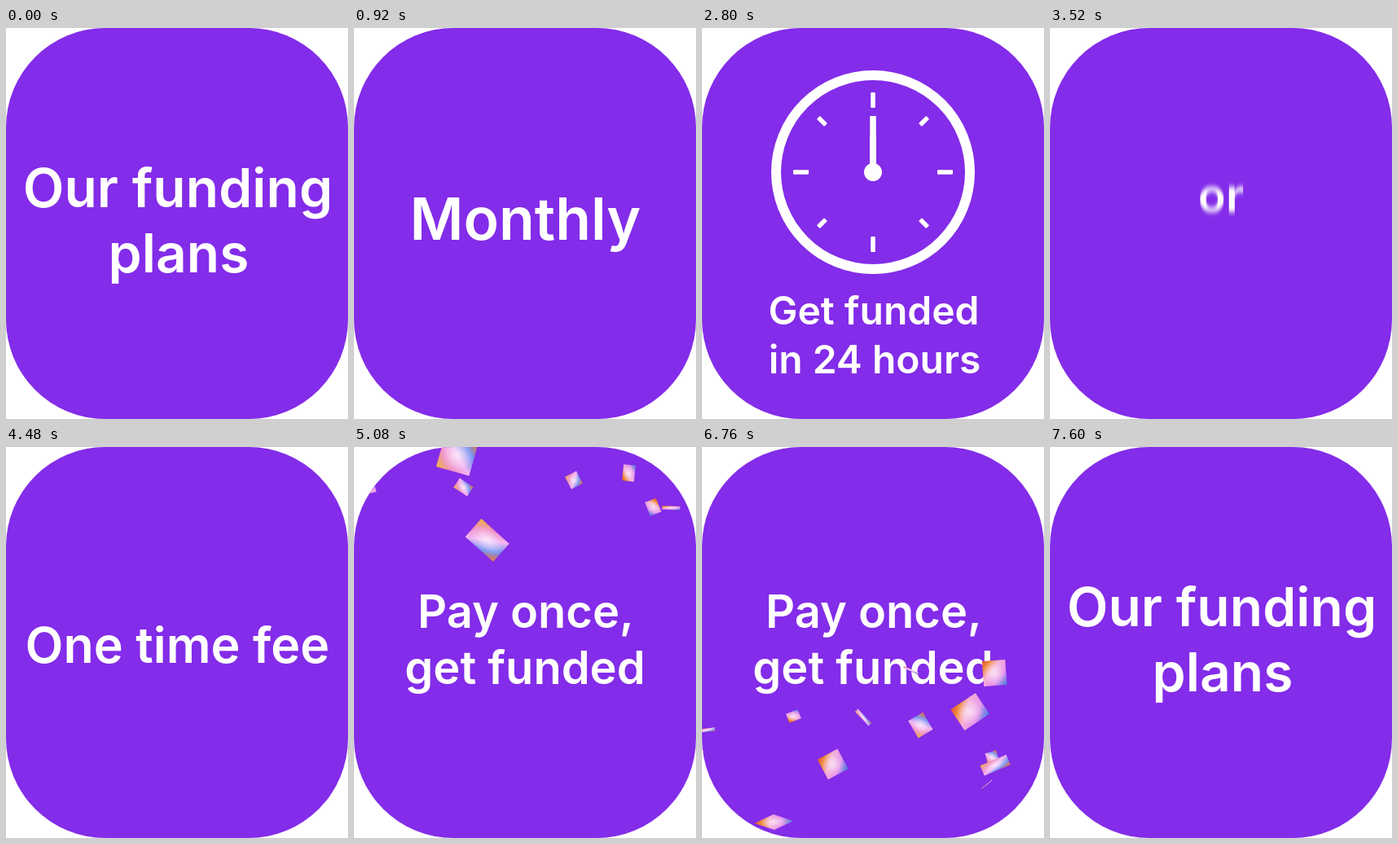
An HTML page for the animation above (7640 ms loop, 420x480 px).

```html
<!DOCTYPE html>
<html lang="en">
<head>
<meta charset="utf-8">
<title>Our funding plans</title>
<style>
  html, body { margin: 0; width: 100%; height: 100%; overflow: hidden; background: #fff; }
  svg { display: block; width: 420px; height: 480px; }
  text { font-family: Inter, "Open Sans", sans-serif; font-weight: 600; fill: #fff; text-anchor: middle; }
  .hand { isolation: isolate; stroke: #fff; }
  .hand line { mix-blend-mode: plus-lighter; }
</style>
</head>
<body>
<svg viewBox="0 0 420 480" xmlns="http://www.w3.org/2000/svg">
  <defs>
    <clipPath id="card"><rect width="420" height="480" rx="122"/></clipPath>
    <linearGradient id="foil0" x1="0" y1="0" x2="1" y2="1">
      <stop offset="0" stop-color="#f0b93c"/><stop offset=".25" stop-color="#ee8cc0"/>
      <stop offset=".5" stop-color="#f3b5f2"/><stop offset=".75" stop-color="#6f8df2"/>
      <stop offset="1" stop-color="#ef7733"/>
    </linearGradient>
    <linearGradient id="foil1" x1="1" y1="0" x2="0" y2="1">
      <stop offset="0" stop-color="#3f7fe0"/><stop offset=".3" stop-color="#e58fe8"/>
      <stop offset=".6" stop-color="#f5b0d8"/><stop offset=".82" stop-color="#ef8a3a"/>
      <stop offset="1" stop-color="#e2503f"/>
    </linearGradient>
    <radialGradient id="shine">
      <stop offset="0" stop-color="#fff" stop-opacity=".65"/>
      <stop offset="1" stop-color="#fff" stop-opacity="0"/>
    </radialGradient>
  </defs>
  <g clip-path="url(#card)">
    <rect width="420" height="480" fill="#832ce9"/>
    <g id="title" font-size="66">
      <text x="211" y="220">Our funding</text>
      <text x="212" y="300">plans</text>
    </g>
    <g id="monthly" font-size="71.5"><text x="210.5" y="260">Monthly</text></g>
    <g id="clock">
      <circle cx="210" cy="177" r="119" fill="none" stroke="#fff" stroke-width="12"/>
      <g id="dial" transform="translate(210 177)"></g>
      <g font-size="48">
        <text x="211" y="364">Get funded</text>
        <text x="212" y="424">in 24 hours</text>
      </g>
    </g>
    <g id="or" font-size="56"><text x="210" y="255.5">or</text></g>
    <g id="fee" font-size="61"><text x="210.5" y="265">One time fee</text></g>
    <g id="once" font-size="56">
      <text x="211" y="222">Pay once,</text>
      <text x="210" y="291">get funded</text>
    </g>
    <g id="confetti"></g>
  </g>
</svg>
<script>
const LOOP = 7640, STEP = 40, SHUTTER = 10;
const ENTER = 300, EXIT = 200, TRAVEL = 480;
const $ = id => document.getElementById(id);

function add(parent, tag, attrs) {
  const el = document.createElementNS('http://www.w3.org/2000/svg', tag);
  for (const key in attrs) el.setAttribute(key, attrs[key]);
  parent.append(el);
  return el;
}

// Scenes: id, start of the slide in, start of the slide out
const scenes = [
  ['title', 6880, LOOP + 560],
  ['monthly', 660, 1300],
  ['clock', 1400, 2860],
  ['or', 2960, 3441],
  ['fee', 3545, 4540],
  ['once', 4640, 6780],
].map(([id, start, end]) => {
  const filter = add(document.querySelector('defs'), 'filter', {
    id: 'blur-' + id, filterUnits: 'userSpaceOnUse', x: 0, y: -200, width: 420, height: 880,
    'color-interpolation-filters': 'sRGB',
  });
  return { id, start, end, el: $(id), blur: add(filter, 'feGaussianBlur', { stdDeviation: '0 0' }) };
});

function offset(scene, t) {
  if (t < scene.start + ENTER) {
    const p = Math.max(0, (t - scene.start) / ENTER);
    return TRAVEL * (1 - p) ** 4;
  }
  const p = Math.max(0, (t - scene.end) / EXIT);
  return -TRAVEL * p ** 3;
}

function drawScene(scene, now) {
  const t = now < scene.end + EXIT - LOOP ? now + LOOP : now;
  const shown = t >= scene.start && t < scene.end + EXIT;
  scene.el.style.display = shown ? '' : 'none';
  if (!shown) return;
  const smear = Math.abs(offset(scene, t + SHUTTER / 2) - offset(scene, t - SHUTTER / 2));
  scene.el.setAttribute('transform', `translate(0 ${offset(scene, t).toFixed(2)})`);
  if (smear > 0.3) {
    scene.blur.setAttribute('stdDeviation', `0 ${(smear / 3.46).toFixed(2)}`);
    scene.el.setAttribute('filter', `url(#blur-${scene.id})`);
  } else scene.el.removeAttribute('filter');
}

// Clock
const dial = $('dial'), SAMPLES = 32;
for (let i = 0; i < 8; i++) {
  const half = i % 2 ? 6.5 : 9.5;
  add(dial, 'rect', {
    x: -2.75, y: -88.5 - half, width: 5.5, height: half * 2, rx: 1, fill: '#fff',
    transform: `rotate(${i * 45})`,
  });
}
function makeHand(length, width) {
  const group = add(dial, 'g', { class: 'hand', 'stroke-width': width });
  return Array.from({ length: SAMPLES }, () =>
    add(group, 'line', { y2: -length, 'stroke-opacity': 1 / SAMPLES }));
}
const minute = makeHand(69, 7.5), hour = makeHand(45, 8);
add(dial, 'circle', { r: 11, fill: '#fff' });

// Two turns of the hour hand
function hourAngle(t) {
  const p = Math.min(1, Math.max(0, (t - 1380) / 1300));
  return 360 * (1 - Math.cos(Math.PI * p));
}
function drawHands(t) {
  for (let i = 0; i < SAMPLES; i++) {
    const angle = hourAngle(t - SHUTTER * (1 - i / (SAMPLES - 1)));
    hour[i].setAttribute('transform', `rotate(${angle})`);
    minute[i].setAttribute('transform', `rotate(${angle * 12 % 360})`);
  }
}

// Confetti: x, y, side, tilt, squash at the moment POSE
const POSE = 5800;
const diamonds = [
  [78, 15, 34, -5, .28], [77, 76, 53, 8, .42], [368, 75, 35, 65, .62], [386, 239, 25, 10, .95],
];
const flakes = [
  [39, 84, 17, -12, .95], [147, 119, 15, -10, .8], [415, 90, 25, 75, .25], [323, 135, 24, 48, .03],
  [7, 147, 26, 40, .2], [18, 166, 24, -20, .9], [204, 192, 24, -62, .3], [290, 217, 27, 20, .75],
  [111, 227, 11, 70, .4], [251, 246, 33, -76, .04], [173, 293, 32, -72, .2], [132, 341, 42, 11, .95],
  [215, 321, 21, 4, .45], [122, 384, 20, 65, .38], [265, 376, 17, 28, .9], [323, 357, 20, -45, .28],
  [380, 391, 22, -28, .06], [370, 416, 18, 60, .08], [145, 458, 17, 30, .9], [163, 462, 46, 55, .25],
  [30, 412, 28, -42, .02], [335, 272, 22, -20, .2],
];

let seed = 11;
const random = () => (seed = seed * 16807 % 2147483647) / 2147483647;
const later = Array.from({ length: 12 }, () => [
  random() * 420, -50 - random() * 110, 12 + random() * 26, random() * 180 - 90, random(),
]);

function makePiece([x, y, side, tilt, squash], spin) {
  const el = add($('confetti'), 'g', {});
  const box = { x: -side / 2, y: -side / 2, width: side, height: side };
  const turn = `rotate(${spin})`;
  add(el, 'rect', { ...box, transform: turn, fill: `url(#foil${random() < .5 ? 0 : 1})` });
  add(el, 'rect', { ...box, transform: turn, fill: 'url(#shine)' });
  return {
    el, x, y, tilt, flip: Math.acos(squash),
    fall: .42 + random() * .08, drift: random() * .06 - .03,
    roll: random() * .16 - .08, tumble: .003 + random() * .005,
  };
}
const pieces = [
  ...diamonds.map(d => makePiece(d, 45)),
  ...[...flakes, ...later].map(d => makePiece(d, 0)),
];

function drawPiece(p, t) {
  const dt = t - POSE, y = p.y + p.fall * dt;
  const shown = t > 4600 && t < 7300 && y > -50 && y < 530;
  p.el.style.display = shown ? '' : 'none';
  if (!shown) return;
  const squash = Math.cos(p.flip + p.tumble * dt);
  p.el.setAttribute('transform',
    `translate(${p.x + p.drift * dt} ${y}) rotate(${p.tilt + p.roll * dt}) scale(1 ${squash.toFixed(4)})`);
}

function draw(t) {
  for (const scene of scenes) drawScene(scene, t);
  drawHands(t);
  for (const piece of pieces) drawPiece(piece, t);
}

const begin = performance.now();
function frame() {
  const t = Math.max(0, performance.now() - begin) % LOOP;
  draw(Math.floor(t / STEP) * STEP);
  requestAnimationFrame(frame);
}
frame();
</script>
</body>
</html>
```
